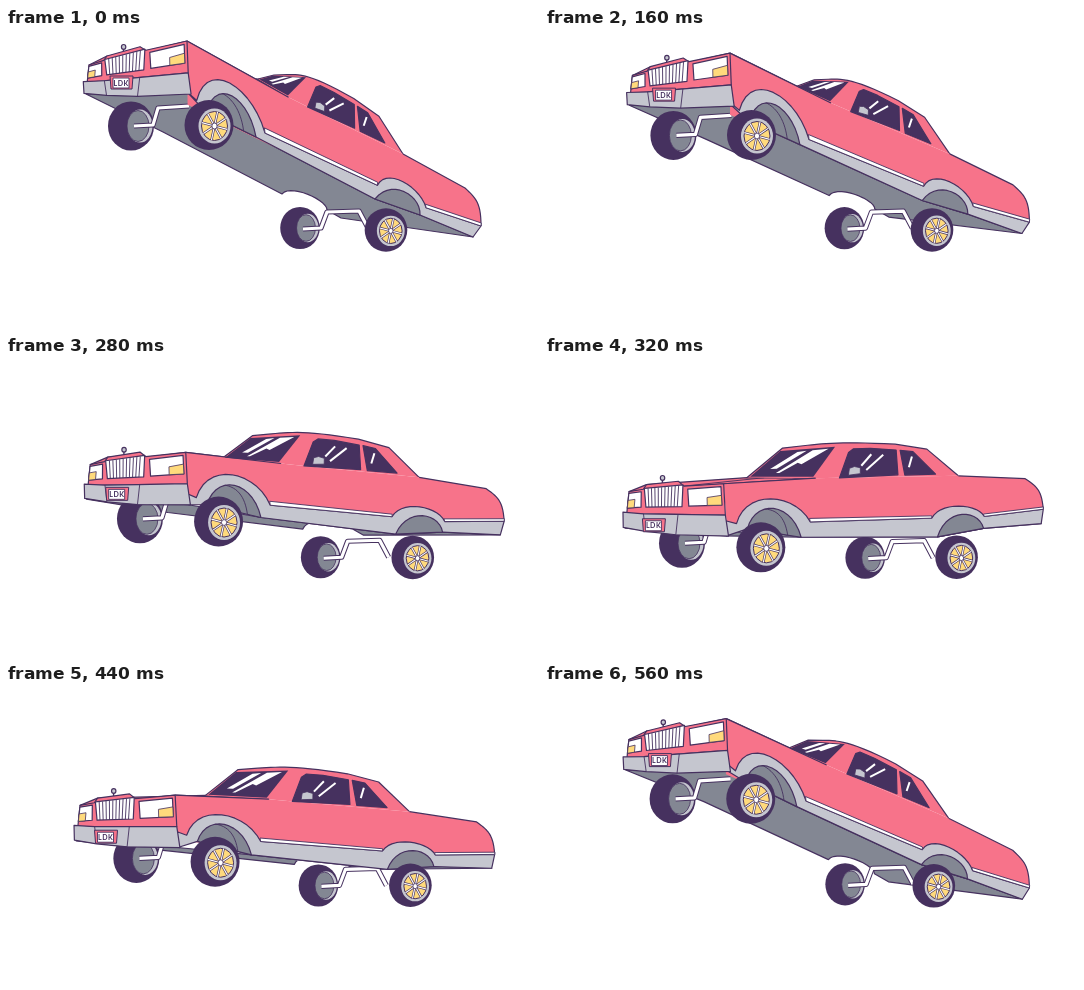
Animation of 533x300 px, one loop 0.6 s. Source, as an HTML page with a canvas:

```html
<!DOCTYPE html>
<html lang="en">
<head>
<meta charset="utf-8">
<title>Bouncing lowrider</title>
<style>
  html, body { margin: 0; width: 100%; height: 100%; overflow: hidden; background: #fff; }
  canvas { display: block; }
</style>
</head>
<body>
<canvas id="stage" width="533" height="300"></canvas>
<script>
const ctx = document.getElementById('stage').getContext('2d');
const INK = '#46315f', PINK = '#f7738a', LIGHT = '#c5c6cf', GREY = '#838793', YELLOW = '#ffda7c', WHITE = '#fff';
const LOOP = 600, STEP = 40;

// Bounce: time, lift of the nose, sideways sway, dip of the tail.
const BOUNCE = [
  [0, 1, 0, 0], [160, .91, 5, 0], [240, .63, 3.5, -3], [320, .15, 7, -8],
  [400, 0, 0, 0], [480, .59, -6, 7], [560, .84, 2, 13]];

// Guide points with the nose down and with the nose up.
const GUIDES = {
  side: [[171, 148, 488, 155, 258, 177], [182, 13, 475, 198, 259, 105]],
  sill: [[249, 194, 385, 188, 430, 177, 487, 170], [250, 109, 369, 171, 414, 187, 467, 209]],
  trunk: [[470, 125, 486, 136], [459, 160, 475, 175]],
  cabin: [[282, 131, 286, 94, 404, 125], [300, 78, 305, 46, 397, 126]],
  screen: [[185, 134, 224, 100], [252, 51, 268, 47]],
  front: [[76, 153, 170, 148, 173, 200, 72, 191], [83, 37, 181, 13, 183, 66, 80, 66]],
  plate: [[99, 190], [115, 55]],
  wheels: [[135, 203, 214, 208, 319, 202, 409, 201], [125, 98, 203, 97, 294, 200, 380, 202]],
};

const pairs = n => n.reduce((out, v, i) => (i % 2 ? out[out.length - 1].push(v) : out.push([v]), out), []);
const mix = (a, b, k) => [a[0] + (b[0] - a[0]) * k, a[1] + (b[1] - a[1]) * k];

// Cyclic cubic Hermite interpolation of one column of BOUNCE.
function bounce(t, column) {
  const n = BOUNCE.length;
  const time = k => BOUNCE[(k + n) % n][0] + LOOP * Math.floor(k / n);
  const value = k => BOUNCE[(k + n) % n][column];
  const slope = k => {
    const before = time(k) - time(k - 1), after = time(k + 1) - time(k);
    return 0.9 * ((value(k) - value(k - 1)) / before * after
      + (value(k + 1) - value(k)) / after * before) / (before + after);
  };
  const i = BOUNCE.filter(key => key[0] <= t).length - 1;
  const h = time(i + 1) - time(i), s = (t - time(i)) / h;
  return value(i) * (1 + 2 * s) * (1 - s) ** 2 + value(i + 1) * s * s * (3 - 2 * s)
    + h * (slope(i) * s * (1 - s) ** 2 + slope(i + 1) * s * s * (s - 1));
}

// Guide points of a part: blended by lift, then swayed, with the rear stretched and dipped.
function guide(name, { lift, sway, dip }) {
  const [low, high] = GUIDES[name].map(pairs);
  return low.map((p, i) => {
    const [x, y] = mix(p, high[i], lift);
    const rear = Math.max(0, (x - 250) / 230);
    return [x + sway + 40 * rear * lift * (1 - lift), y + rear * dip];
  });
}

// Affine map that carries three rest points to three posed points.
function affine([a, b, c], [p, q, r]) {
  const bx = b[0] - a[0], by = b[1] - a[1], cx = c[0] - a[0], cy = c[1] - a[1];
  const det = bx * cy - by * cx;
  return (...n) => pairs(n).map(([x, y]) => {
    const u = ((x - a[0]) * cy - (y - a[1]) * cx) / det;
    const v = ((y - a[1]) * bx - (x - a[0]) * by) / det;
    return [0, 1].map(k => p[k] + u * (q[k] - p[k]) + v * (r[k] - p[k]));
  });
}

const quad = (a, b, c, d) => (...n) => pairs(n).map(([u, v]) => mix(mix(a, b, u), mix(d, c, u), v));

const bezier = (a, b, c, d) => Array.from({ length: 15 }, (_, i) => {
  const t = i / 14, ab = mix(a, b, t), bc = mix(b, c, t), cd = mix(c, d, t);
  return mix(mix(ab, bc, t), mix(bc, cd, t), t);
});

function trace(points, closed) {
  ctx.beginPath();
  points.forEach(p => ctx.lineTo(...p));
  if (closed) ctx.closePath();
}
function stroke(color, width) {
  ctx.strokeStyle = color;
  ctx.lineWidth = width;
  ctx.stroke();
}
function fill(color, outline) {
  ctx.fillStyle = color;
  ctx.fill();
  if (outline) stroke(INK, outline);
}
function shape(points, color, outline = 1.2) {
  trace(points, true);
  fill(color, outline);
}
function line(points, color = INK, width = 1.2) {
  trace(points, false);
  stroke(color, width);
}
function oval(x, y, rx, ry, color, outline = 0) {
  ctx.beginPath();
  ctx.ellipse(x, y, rx, ry, 0, 0, 7);
  fill(color, outline);
}

function farWheel([x, y], s) {
  oval(x, y, 23 * s, 24.5 * s, INK);
  oval(x + 9 * s, y, 12.5 * s, 16.5 * s, LIGHT);
  oval(x + 7 * s, y, 11 * s, 15.5 * s, GREY, 0.8);
}

function nearWheel([x, y], s) {
  const cx = x + 5.5 * s, cy = y + s, rx = 13 * s, ry = 14.5 * s;
  oval(x, y, 24.5 * s, 25 * s, INK);
  oval(cx, cy, 16 * s, 17.5 * s, LIGHT);
  oval(cx, cy, rx, ry, YELLOW, 1);
  for (let i = 0; i < 8; i++) {
    const a = (i + 0.3) * Math.PI / 4, spoke = [[cx, cy], [cx + rx * Math.cos(a), cy + ry * Math.sin(a)]];
    line(spoke, INK, 2.4);
    line(spoke, WHITE, 1.1);
  }
  oval(cx, cy, 2.6 * s, 2.9 * s, WHITE, 0.8);
}

function axle([x, y], ...n) {
  const points = pairs(n).map(([dx, dy]) => [x + dx, y + dy]);
  line(points, INK, 5.2);
  line(points, WHITE, 3.2);
}

function drawFront(front, [x, y]) {
  shape(front(0, 0, .15, -.03, .18, -.14, .52, -.14, .58, -.02, 1, 0, 1, .6, 0, .6), PINK);
  shape(front(0, .05, .13, .03, .14, .43, 0, .45), WHITE);
  shape(front(0, .24, .07, .22, .07, .44, 0, .45), YELLOW, 0.8);
  shape(front(.62, .05, .97, .05, .97, .41, .63, .42), WHITE);
  shape(front(.82, .25, .97, .22, .97, .41, .82, .41), YELLOW, 0.8);
  shape(front(.16, -.05, .57, -.05, .56, .43, .19, .43), WHITE);
  for (let u = .2; u < .55; u += .036) line(front(u, -.04, .04 + u * .9, .43), INK, 0.9);
  line(front(.35, -.14, .35, -.22), INK, 1.4);
  const [[ox, oy]] = front(.35, -.26);
  oval(ox, oy, 2.2, 2.4, LIGHT, 1.2);

  shape(front(-.04, .56, .17, .6, .5, .6, 1, .6, 1.02, 1, .5, 1.06, .2, 1.04, -.02, .98), LIGHT);
  line(front(.17, .6, .2, 1.04), INK, 0.9);
  line(front(.52, .6, .5, 1.06), INK, 0.9);
  shape([[x - 11, y - 7], [x + 12, y - 7], [x + 11, y + 6], [x - 10, y + 6]], PINK, 1);
  shape([[x - 8, y - 5], [x + 8, y - 5], [x + 8, y + 5], [x - 8, y + 5]], WHITE, 0.9);
  ctx.fillStyle = INK;
  ctx.font = '700 7px Lato, sans-serif';
  ctx.letterSpacing = '0.5px';
  ctx.textAlign = 'center';
  ctx.fillText('LDK', x + 0.2, y + 2.6);
}

function drawGlass(cabin, screen) {
  shape(screen(.02, .1, .95, .14, .95, .96, .03, .97), INK, 0);
  shape(screen(.36, .2, .5, .18, .3, .72, .2, .72), WHITE, 0);
  shape(screen(.6, .18, .86, .18, .62, .6, .54, .55, .4, .85, .35, .85), WHITE, 0);
  shape(cabin(284, 131, 293, 105, 298, 101, 315, 100, 341, 101, 343, 126), INK);
  shape(cabin(345, 101, 358, 102, 381, 124, 350, 126), INK);
  line(cabin(306, 118, 316, 106), WHITE, 2);
  line(cabin(311, 122, 328, 106), WHITE, 2);
  line(cabin(354, 118, 357, 107), WHITE, 2);
  shape(cabin(293, 128, 294, 121, 299, 119, 305, 120, 305, 126), LIGHT, 0.8);
}

function drawCar(t) {
  const motion = { lift: bounce(t, 1), sway: bounce(t, 2), dip: bounce(t, 3) };
  const corners = guide('front', motion), [plate] = guide('plate', motion);
  const [noseFar, noseNear, bumperNear, bumperFar] = corners;
  const [foot, top] = guide('screen', motion);
  const cabinRefs = guide('cabin', motion), [windowFoot, roof, pillar] = cabinRefs;
  const [sillFront, sillRear, tailFront, tailEnd] = guide('sill', motion);
  const [trunk, lamp] = guide('trunk', motion);
  const sideRefs = guide('side', motion), stripeEnd = sideRefs[1];
  const [frontFar, frontNear, rearFar, rearNear] =
    guide('wheels', { lift: motion.lift, sway: motion.sway / 2, dip: 0 });
  const side = affine(pairs(GUIDES.side[0]), sideRefs);
  const cabin = affine(pairs(GUIDES.cabin[0]), cabinRefs);
  const front = quad(...corners);
  const [screenFoot] = cabin(260, 132);
  const screen = quad(top, roof, screenFoot, foot);

  // Underside: the far lower edge is the near one moved across the car.
  const [archA, archB] = side(392, 158, 424, 158);
  const farArch = bezier(sillRear, mix(archA, sillRear, .5), mix(archB, tailFront, .5), tailFront);
  const farEdge = [sillFront, ...farArch, [tailFront[0] + 14, tailFront[1] + 8]].map(([x, y]) => [x - 93, y - 5]);
  shape([bumperFar, ...farEdge, tailEnd, tailFront, sillRear, sillFront, bumperNear], GREY);
  farWheel(frontFar, 1);
  farWheel(rearFar, .86);
  axle(frontFar, 3, 0, 22, -1, 27, -18, 58, -20);
  axle(rearFar, 3, 1, 21, 0, 27, -16, 59, -17, 68, 0);

  // Bonnet and cabin.
  shape([...front(0, 0, .18, -.14), foot, screenFoot, noseNear], PINK);
  line([...front(.57, -.02), mix(foot, screenFoot, .25)], INK, 0.9);
  const roofLine = [foot, top, ...bezier(mix(top, roof, .35), mix(top, roof, .7), roof, ...cabin(340, 95)),
    ...cabin(372, 99), pillar];
  shape([...roofLine, windowFoot, screenFoot], PINK, 0);
  line(roofLine);

  // Body side.
  const tail = bezier(trunk, mix(trunk, lamp, .7), lamp, stripeEnd);
  shape([noseNear, screenFoot, windowFoot, pillar, ...tail, ...side(378, 174, 258, 183, 176, 188)], PINK, 0);
  line([noseNear, screenFoot]);
  line([pillar, ...tail]);
  const frontArch = bezier(...side(185, 182, 192, 152, 240, 152, 258, 177));
  const rearArch = bezier(...side(378, 168, 386, 153, 422, 153, 430, 164));
  const frontHouse = bezier(...side(196, 186, 202, 160, 238, 160), sillFront);
  shape([...side(174, 180), ...frontArch, ...rearArch, stripeEnd, tailEnd, tailFront, sillRear,
    sillFront, frontHouse[0], bumperNear], LIGHT);
  shape(side(257, 174, 378, 166, 378, 168, 258, 177), WHITE, 0.9);
  shape(side(429, 162, 488, 153, 488, 155, 430, 164), WHITE, 0.9);
  shape(frontHouse, GREY);
  line(bezier(...side(212, 168, 226, 168, 233, 176), mix(sillFront, frontHouse[0], .25)), INK, 0.9);
  shape(bezier(sillRear, archA, archB, tailFront), GREY);

  drawGlass(cabin, screen);
  drawFront(front, plate);
  nearWheel(frontNear, 1);
  nearWheel(rearNear, .87);
}

ctx.lineJoin = 'round';
function frame() {
  const t = Math.floor(performance.now() % LOOP / STEP) * STEP;
  ctx.fillStyle = WHITE;
  ctx.fillRect(0, 0, 533, 300);
  drawCar(t);
  requestAnimationFrame(frame);
}
frame();
</script>
</body>
</html>
```
